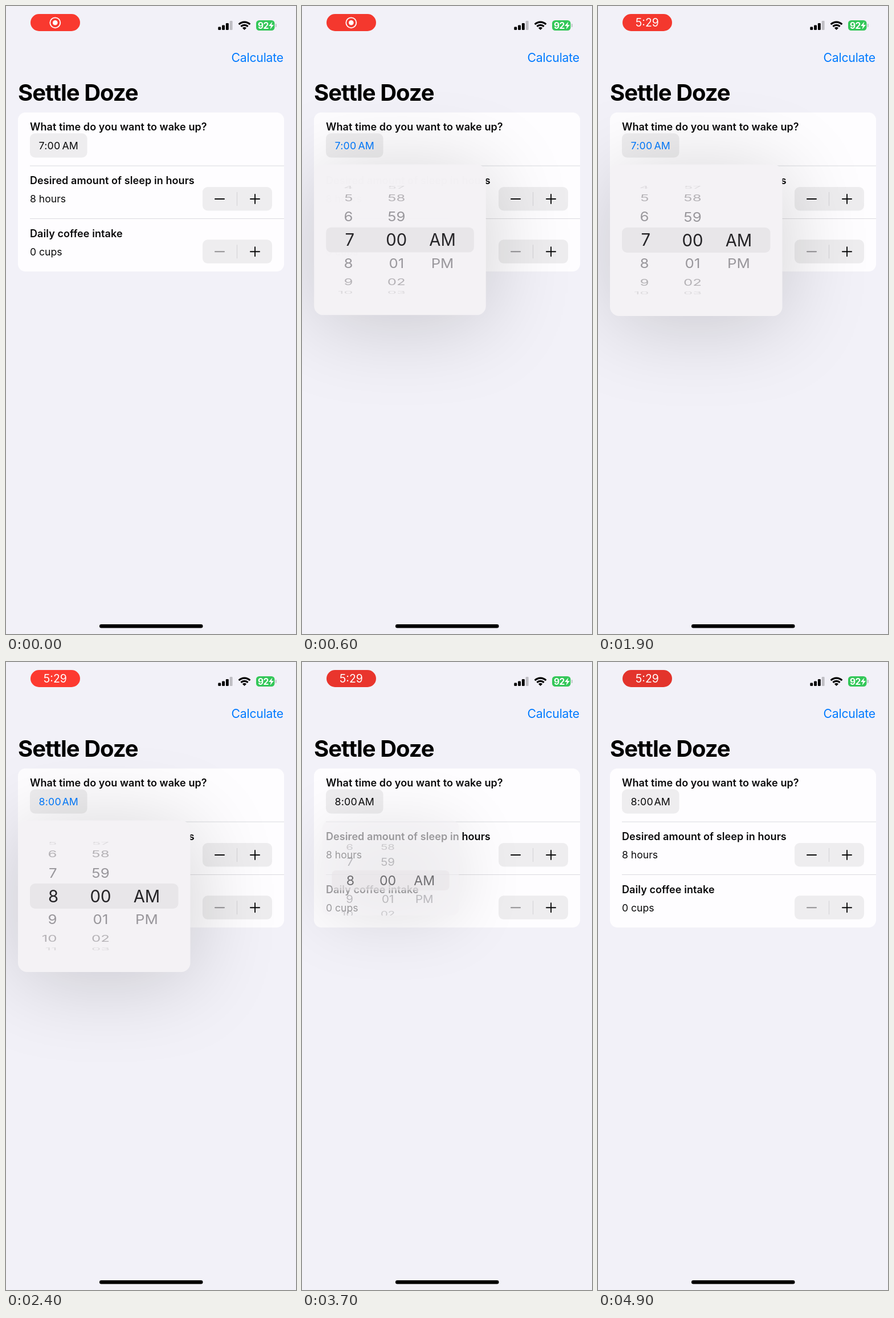
Write an HTML page with a canvas that moves like this. It is 509 px wide and 1100 px high and loops after 5000 ms.

```html
<!DOCTYPE html>
<html lang="en">
<head>
<meta charset="utf-8">
<title>Sleep form</title>
<style>
html, body { margin: 0; width: 100%; height: 100%; overflow: hidden; background: #f2f1f8; }
canvas { display: block; }
</style>
</head>
<body>
<canvas id="stage" width="509" height="1100"></canvas>
<script>
const c = document.getElementById('stage').getContext('2d');
const LOOP = 5000, BLUE = '#007aff', INK = '#0a0a0b';
const OPEN = 100, CLOSE = 3620;
const clamp = v => Math.max(0, Math.min(1, v));
const ease = v => (1 - Math.cos(Math.PI * clamp(v))) / 2;
// Critically damped spring: what is left of the distance
const rest = x => x <= 0 ? 1 : (1 + x) * Math.exp(-x);

function box(x, y, w, h, r, fill) {
  c.fillStyle = fill;
  c.beginPath();
  c.roundRect(x, y, w, h, r);
  c.fill();
}

function text(str, x, y, size, fill, { weight = 400, align = 'left', spacing = 0 } = {}) {
  c.font = `${weight} ${size}px Inter, "Liberation Sans", sans-serif`;
  c.letterSpacing = spacing + 'px';
  c.textAlign = align;
  c.fillStyle = fill;
  c.fillText(str, x, y);
}

function disc(x, y, r, fill) {
  c.fillStyle = fill;
  c.beginPath();
  c.arc(x, y, r, 0, 7);
  c.fill();
}

function recordingPill(t) {
  const dark = (1 - Math.cos((t - 250) / 1000 * Math.PI)) / 2;
  const mix = (a, b) => Math.round(a + (b - a) * dark);
  box(43, 14, 87, 30, 15, `rgb(${mix(255, 216)},${mix(58, 50)},${mix(48, 42)})`);
  const swap = ease((t - 1250) / 320);
  c.globalAlpha = 1 - swap;
  disc(86.3, 29.3, 4.3, '#fff');
  c.strokeStyle = '#fff';
  c.lineWidth = 1.8;
  c.beginPath();
  c.arc(86.3, 29.3, 9, 0, 7);
  c.stroke();
  c.globalAlpha = swap;
  text('5:29', 86.3, 36.2, 19.4, '#fff', { align: 'center' });
  c.globalAlpha = 1;
}

function statusIcons() {
  [5.5, 8.5, 12, 16].forEach((h, i) =>
    box(372.3 + i * 6.8, 42 - h, 4.9, h, 1.3, i < 3 ? '#000' : '#bfbec4'));

  c.save();
  c.beginPath();
  c.moveTo(418.5, 42);
  c.lineTo(400.5, 24);
  c.lineTo(436.5, 24);
  c.clip();
  c.strokeStyle = '#000';
  c.lineWidth = 3.2;
  for (const r of [8.6, 13.8]) {
    c.beginPath();
    c.arc(418.5, 42, r, 0, 7);
    c.stroke();
  }
  disc(418.5, 42, 5, '#000');
  c.restore();

  box(439, 25, 32.5, 18, 5.5, '#34c759');
  box(473, 31, 1.8, 6, 1, '#bfbec4');
  text('92', 442, 39.7, 15.6, '#fff', { weight: 700, spacing: -0.6 });
  c.beginPath();
  [[467.5, 27.5], [461, 35], [465, 35], [463.5, 41], [470, 33], [466, 33]].forEach(p => c.lineTo(...p));
  c.fill();
}

function stepper(y, minus) {
  box(345, y, 122, 41.5, 9, '#eeedef');
  box(405, y + 9, 1, 24, 0, '#d2d1d5');
  box(366, y + 20, 18, 1.9, 1, minus);
  box(428, y + 20, 18, 1.9, 1, INK);
  box(436.1, y + 12, 1.9, 18, 1, INK);
}

function form(t) {
  const label = (str, y) => text(str, 42, y, 18, INK, { weight: 600, spacing: 0.08 });
  text('Calculate', 395.5, 98.2, 21.2, BLUE, { spacing: -0.2 });
  text('Settle Doze', 21, 166, 40, '#000', { weight: 700, spacing: -1 });
  box(21, 186.5, 467, 278.5, 13, '#fefdff');
  box(42, 279.5, 446, 1, 0, '#dcdbdf');
  box(42, 372, 446, 1, 0, '#dcdbdf');

  label('What time do you want to wake up?', 218);
  box(42, 223, 100.5, 42.5, 9, '#eeedef');
  const tint = t > OPEN && t < CLOSE ? BLUE : INK;
  text(t < 2330 ? '7:00' : '8:00', 57.5, 250.6, 17.8, tint, { spacing: 0.2 });
  text('AM', 98.5, 250.6, 17.8, tint);

  label('Desired amount of sleep in hours', 312);
  text('8 hours', 42, 344, 17.6, INK);
  stepper(317, INK);

  label('Daily coffee intake', 404.5);
  text('0 cups', 42, 436.7, 17.6, INK);
  stepper(409.3, '#929194');
}

// One wheel column; pos is the row at its centre
function wheel(pos, row, x, align, size, alpha, zoom) {
  for (let i = Math.ceil(pos - 3.4); i <= pos + 3.4; i++) {
    const str = row(i);
    if (!str) continue;
    const angle = (i - pos) * 25.5 * Math.PI / 180;
    const k = Math.cos(angle);
    c.save();
    c.translate(x, 410 + 95 * zoom * Math.sin(angle));
    c.scale(1, k);
    c.globalAlpha = alpha * (zoom > 1 ? 1 : 0.55 * k);
    text(str, 0, size * 0.364, size, zoom > 1 ? '#242326' : '#3c3b40', { align });
    c.restore();
  }
}

function wheels(t, alpha, zoom) {
  const size = zoom > 1 ? 29.3 : 25.8;
  const hour = 7 + ease((t - 1880) / 420);
  wheel(hour, i => '' + i, zoom > 1 ? 92 : 89.5, 'right', size, alpha, zoom);
  wheel(0, i => ('' + (i + 60) % 60).padStart(2, '0'), 166, 'center', size, alpha, zoom);
  wheel(0, i => ['AM', 'PM'][i], 247, 'center', size, alpha, zoom);
}

function popup(t) {
  const p = t < CLOSE ? 1 - rest((t - OPEN) * 0.0154) : rest((t - CLOSE) * 0.0122);
  if (p < 0.01) return;
  const s = 0.2 + 0.8 * p, alpha = p ** 1.6;
  c.save();
  c.translate(92, 277.5);
  c.scale(s, s);
  c.translate(-92, -277.5);

  c.globalAlpha = alpha;
  c.shadowColor = 'rgba(0,0,10,.18)';
  c.shadowBlur = 150 * s;
  c.shadowOffsetX = 3 * s;
  c.shadowOffsetY = 14 * s;
  box(21, 277.5, 302.5, 265.5 * s, 16, '#f4f2f5');
  c.shadowColor = 'transparent';
  c.clip();
  box(42, 388, 260.5, 44, 9, '#e8e6e9');

  c.save();
  c.beginPath();
  c.rect(21, 277, 303, 111);
  c.rect(21, 432, 303, 111);
  c.clip();
  wheels(t, alpha, 1);
  c.restore();

  c.beginPath();
  c.rect(21, 388, 303, 44);
  c.clip();
  wheels(t, alpha, 1.13);
  c.restore();
}

function draw(now) {
  const t = now % LOOP;
  c.globalAlpha = 1;
  c.fillStyle = '#f2f1f8';
  c.fillRect(0, 0, 509, 1100);
  recordingPill(t);
  statusIcons();
  form(t);
  popup(t);
  box(164, 1083, 181.5, 6.5, 3.2, '#000');
  requestAnimationFrame(draw);
}
requestAnimationFrame(draw);
</script>
</body>
</html>
```
